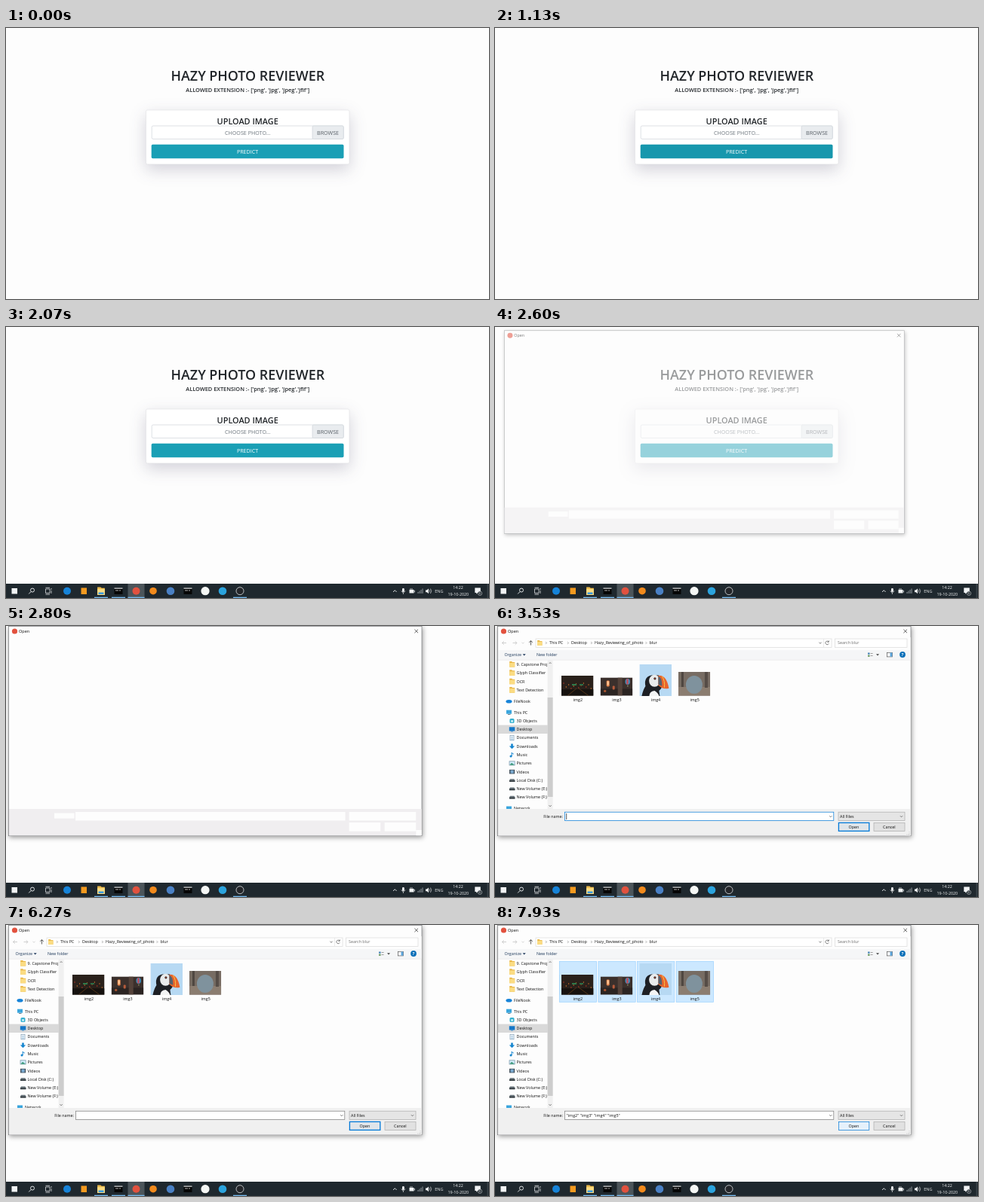
An HTML page for the animation above (8000 ms loop, 640 by 360 pixels).

```html
<!DOCTYPE html>
<html lang="en">
<head>
<meta charset="utf-8">
<title>Photo upload</title>
<style>
  html, body { margin: 0; width: 100%; height: 100%; overflow: hidden; background: #fdfdfd; }
  #stage { display: block; width: 100vw; height: 100vh; }
  text { font-family: "Open Sans", "Noto Sans", sans-serif; white-space: pre; }
  .card { filter: drop-shadow(0 7px 10.5px rgba(40, 35, 75, .2)); }
  .win { filter: drop-shadow(1px 2px 3px rgba(0, 0, 0, .4)); }
</style>
</head>
<body>
<svg id="stage" viewBox="0 0 640 360" xmlns="http://www.w3.org/2000/svg"></svg>
<script>
const LOOP = 8000;
const FPS = 15;
const UI = 5.4;

// Markup helpers
const rect = (x, y, w, h, fill, more = '') =>
  `<rect x="${x}" y="${y}" width="${w}" height="${h}" fill="${fill}" ${more}/>`;
const dot = (x, y, r, fill, more = '') =>
  `<circle cx="${x}" cy="${y}" r="${r}" fill="${fill}" ${more}/>`;
const oval = (x, y, rx, ry, fill, more = '') =>
  `<ellipse cx="${x}" cy="${y}" rx="${rx}" ry="${ry}" fill="${fill}" ${more}/>`;
const shape = (d, fill) => `<path d="${d}" fill="${fill}"/>`;
const line = (d, stroke, w = .7) =>
  `<path d="${d}" fill="none" stroke="${stroke}" stroke-width="${w}"/>`;
const text = (x, y, str, size = UI, fill = '#111', more = '') =>
  `<text x="${x}" y="${y}" font-size="${size}" fill="${fill}" ${more}>${str}</text>`;
const mid = (x, y, str, size, fill, weight = 400) =>
  text(x, y, str, size, fill, `text-anchor="middle" font-weight="${weight}"`);
const group = (id, body, more = '') => `<g id="${id}" ${more}>${body}</g>`;
const box = (x, y, w, h, fill, stroke, more = '') =>
  rect(x, y, w, h, fill, `stroke="${stroke}" stroke-width=".7" ${more}`);
const crop = (x, y, w, h, body) =>
  `<svg x="${x}" y="${y}" width="${w}" height="${h}" viewBox="${x} ${y} ${w} ${h}">${body}</svg>`;
const caretDown = (x, y, color = '#444') => line(`M${x - 1.6} ${y - .8}l1.6 1.6 1.6-1.6`, color);
const folder = (x, y, s = 1) =>
  `<g transform="translate(${x} ${y}) scale(${s})">` +
  shape('M-3.5-3.8h3l1 1h3v6.6h-7z', '#e9b84b') + rect(-3.5, -1.8, 7, 5.6, '#fbdc83') + '</g>';

function page() {
  return mid(320.4, 69.7, 'HAZY PHOTO REVIEWER', 17.9, '#212529', 600) +
    mid(320.2, 84.8, "ALLOWED EXTENSION :- ['png', 'jpg', 'jpeg','jfif']", 7.4, '#212529', 600) +
    box(185.5, 109, 269.5, 72, '#fff', '#e3e3e6', 'rx="2" class="card"') +
    box(193.2, 130, 254, 17.5, '#fff', '#ced4da', 'rx="1.8"') +
    mid(320.2, 127.9, 'UPLOAD IMAGE', 10.9, '#212529', 600) +
    mid(320.2, 141.6, 'CHOOSE PHOTO...', 7.15, '#6c757d') +
    box(406, 130, 41.2, 17.5, '#e9ecef', '#ced4da', 'rx="1.5"') +
    mid(426.6, 141.6, 'BROWSE', 7.15, '#596067') +
    rect(192.7, 154.7, 254.8, 18.5, '#1a9fb5', 'rx="1.8" id="predict"') +
    mid(320, 166.6, 'PREDICT', 7.1, '#fff');
}

function terminal(x) {
  return rect(x - 5.5, 346.5, 11, 8.5, '#060606') + rect(x - 5.5, 346.5, 11, 1.3, '#d4d7da') +
    line(`M${x - 4} 350h4m1 0h2`, '#ddd', .8);
}

function taskbar() {
  const y = 350.7, white = '#f1f3f4';
  const running = [[117, 18], [140, 18], [161.5, 22], [301, 18]];
  return rect(0, 341, 640, 19, '#1f282e') +
    rect(161.5, 341, 22, 19, '#4c555a') +
    running.map(([x, w]) => rect(x, 358.7, w, 1.3, '#76b9ed')).join('') +
    rect(7.5, 347, 7.5, 7.5, white) +
    dot(35, 349.6, 2.5, 'none', `stroke="${white}" stroke-width=".9"`) +
    line('M33.2 351.5l-3 3', white, .9) +
    line('M52.5 348h5.5v5.5h-5.5zM60 347v2m0 1v4M52.5 346.3h5.5m-5.5 9h5.5', white) +
    dot(81, y, 5, '#1683d8') +
    rect(99.5, 346.5, 7.5, 8.5, '#f39a1f') +
    folder(126, y, 1.4) + rect(122.5, 352.5, 7, 2.5, '#3a9be0') +
    terminal(149) +
    dot(172.5, y, 5, '#e2523f') +
    dot(195, y, 4.8, '#f28a1c') +
    dot(218, y, 5.3, '#4a80c4') +
    terminal(241) +
    dot(264, y, 5.6, '#f4f6f4') +
    dot(287, y, 5.3, '#2ba3dd') +
    dot(310, y, 5, '#24262a', 'stroke="#dfe2e4" stroke-width=".8"') +
    line('M513 352l2.3-2.3 2.3 2.3', white, .9) +
    rect(525, 347, 2.8, 5, white, 'rx="1.3"') + line('M523.8 350.5q2.6 4.5 5.2 0M526.4 353v2', white) +
    rect(534.5, 349, 6, 4.5, white) + line('M536 347v2m2-2v2M541.5 350v2.5', white) +
    line('M546 354v-2m2 2v-3.5m2 3.5v-5m2 5v-6.5', '#8c9398', 1) +
    shape('M556 349.6h1.7l2.2-2v6.6l-2.2-2H556z', white) +
    line('M561 349q1.4 1.8 0 3.6m1.4-5q2.7 3.2 0 6.4', white, .6) +
    text(568.3, 352.7, 'ENG', 5.5, white) +
    mid(599, 348.2, '14:22', 5.3, white) +
    mid(599.3, 356.6, '19-10-2020', 5.3, white) +
    shape('M621.3 346.5h7.5v6.5h-4l-1.8 1.8V353h-1.7z', white) +
    dot(628, 353.8, 2.7, '#1f282e', `stroke="${white}" stroke-width=".5"`) +
    mid(628, 355.4, '6', 4.2, white) +
    line('M638.2 341v19', '#737b80', .5);
}

function tree() {
  const top = ['9. Capstone Proj', 'Glyph Classifier', 'OCR', 'Text Detection'];
  const drives = ['3D Objects', 'Desktop', 'Documents', 'Downloads', 'Music', 'Pictures',
    'Videos', 'Local Disk (C:)', 'New Volume (E:)', 'New Volume (F:)'];
  const icons = [
    y => rect(19.5, y - 3, 6, 6, '#35b0cf', 'rx="1.5"') + rect(21.3, y - 1, 2.5, 3, '#c9eff7'),
    y => rect(18.8, y - 3, 7.5, 5.2, '#1678c8') + rect(21, y + 2.3, 3, .8, '#1678c8'),
    y => box(20, y - 3, 5, 6.3, '#fff', '#7d9cb5') + line(`M21 ${y - 1}h3m-3 1.6h3m-3 1.6h3`, '#5596c8', .5),
    y => shape(`M21.2 ${y - 3.2}h2.6v3h2.4l-3.7 3.6-3.7-3.6h2.4z`, '#1686d0'),
    y => dot(21, y + 2, 1.5, '#1686d0') + line(`M22.2 ${y + 2}v-5q1 2 2.6 2`, '#1686d0', 1),
    y => box(19, y - 2.6, 7.2, 5.2, '#cfeaf8', '#7b95a6') + shape(`M19.4 ${y + 2.3}l2.6-3 4 3z`, '#3c9a7a'),
    y => rect(19, y - 2.8, 7.2, 5.6, '#46535e') + rect(20.5, y - 2, 4.2, 4, '#78a9d0')
  ];
  const disk = y => shape(`M19 ${y}l1-1.6h5.4l1 1.6v2H19z`, '#69747b') + rect(19, y + .4, 7.4, 1.6, '#31383c');
  return rect(4, 131.6, 66, 11.4, '#d9d9d9') +
    top.map((s, i) => folder(22.7, 50.8 + i * 11.35) + text(28.5, 52.8 + i * 11.35, s)).join('') +
    oval(18.5, 100.3, 4, 2.3, '#1683d8') + text(25, 101.8, 'FileNook') +
    rect(15, 111.7, 7, 5, '#3aa5dd') + rect(17, 117.2, 3.5, .8, '#4f6470') + text(25, 116.8, 'This PC') +
    drives.map((s, i) => {
      const y = 126 + i * 11.27;
      return (icons[i] || disk)(y) + text(28.5, y + 1.9, s);
    }).join('') +
    rect(15, 239.5, 7, 4, '#3aa5dd') + text(25, 244, 'Network');
}

function nightRoad(x, y, w, h) {
  let lights = '';
  for (let i = 0; i < 12; i++) {
    lights += dot(x + 3 + i * 3.3, y + 10 + (i * 5) % 8, .7, i % 3 ? '#d9782e' : '#c93426');
  }
  return rect(x, y, w, h, '#2a211b') + rect(x, y + h * .68, w, h * .32, '#16120f') + lights +
    rect(x + 14, y + 11, 6, 2, '#2f7a4b') + rect(x + 24, y + 11, 5, 2, '#2c6d46') +
    line(`M${x + 20} ${y + 17}L${x + 8} ${y + h}M${x + 23} ${y + 17}L${x + 36} ${y + h}`, '#7a4a20', .6);
}

function lanterns(x, y, w, h) {
  return rect(x, y, w, h, '#3b302c') + rect(x, y + 15, w, h - 15, '#2b2422') +
    rect(x + 23, y, 6, h, '#54423a') +
    rect(x + 8, y + 4, 4, 8, '#e8864e', 'rx="1.3"') + rect(x + 9, y + 5, 2, 5, '#ffd0a0') +
    rect(x + 16, y + 11, 3, 5, '#b65b3b', 'rx="1"') + dot(x + 6, y + 18, 1.7, '#a5532f') +
    oval(x + 36, y + 5.5, 3.2, 4, '#3f8fc0') + rect(x + 34.5, y + 2, 2.5, 7, '#c34a56') +
    rect(x + 35.3, y + 10.5, 1.6, 1.5, '#886');
}

function seabird(x, y, w, h) {
  return rect(x, y, w, h, '#b7d9f3') +
    shape(`M${x + 3} ${y + h}q2-9 5-13q-3-14 11-15q11-1 13 9q-2 9-6 12l1 7z`, '#1d1f24') +
    oval(x + 20, y + 22, 7.3, 8, '#e9ebec') +
    shape(`M${x + 13} ${y + h}q0-6 7-7q5 3 6 7z`, '#f4f5f5') +
    shape(`M${x + 25} ${y + 15}q11-1 14 17q-8 2-14-4z`, '#e8642c') +
    shape(`M${x + 25} ${y + 16}q5 1 5 13l-5-2z`, '#56626f') +
    line(`M${x + 30} ${y + 16}q4 6 3 15`, '#f6c64a', 1) +
    dot(x + 20.5, y + 19, 1.6, '#26201f') + dot(x + 20.5, y + 19, .7, '#cf4d32');
}

function forestToy(x, y, w, h) {
  return rect(x, y, w, h, '#776c63') + rect(x, y + 20, w, h - 20, '#8b7d70') +
    rect(x + 4, y, 3, 20, '#4e4640') + rect(x + 35, y, 4, 21, '#554c46') +
    oval(x + 21, y + 17, 11, 12, '#7f929d');
}

function files() {
  const thumbs = [
    [nightRoad, 88, 66, 42.5, 26.7], [lanterns, 139.7, 68.4, 42.6, 24.2],
    [seabird, 191.4, 50.8, 42.6, 42.2], [forestToy, 242.9, 61, 42.3, 31.7]
  ];
  const marks = thumbs.map((_, i) => box(85.3 + i * 51.6, 48.3, 49.3, 54, '#cce8ff', '#99d1ff')).join('');
  return group('marks', marks) + thumbs.map(([draw, x, y, w, h], i) =>
    crop(x, y, w, h, draw(x, y, w, h)) + mid(109.8 + i * 51.6, 99.7, `img${i + 2}`, UI, '#111')).join('');
}

function navBar() {
  const crumbs = [[72, 'This PC'], [101, 'Desktop'], [132, 'Hazy_Reviewing_of_photo'], [204.5, 'blur']];
  const gray = '#777', pale = '#c4c4c4';
  return line('M15 22.5h-5.5m2.3-2.3l-2.3 2.3 2.3 2.3M23.5 22.5h5.5m-2.3-2.3l2.3 2.3-2.3 2.3', pale, .8) +
    caretDown(37, 22.5, pale) +
    line('M47.5 25.5v-6m-2.4 2.4l2.4-2.4 2.4 2.4', '#555', .9) +
    box(54, 17, 392, 11.3, '#fff', '#d9d9d9') + folder(59.3, 22.5, .9) +
    crumbs.map(([x, s]) => line(`M${x - 5} 21l1.5 1.5-1.5 1.5`, gray, .6) + text(x, 24.4, s)).join('') +
    caretDown(431, 22.5) + line('M435.5 17v11', '#dedede', .6) +
    line('M442 21a2.3 2.3 0 1 0 .3 2.3M442.3 19.3v2h-2', '#555', .7) +
    box(450.5, 17, 95.5, 11.3, '#fff', '#d9d9d9') + text(454, 24.4, 'Search blur', UI, '#6d6d6d') +
    rect(4, 32, 546.6, 13, '#f5f6f7') + line('M4 45.2h546.6', '#e2e3e5', .6) +
    text(12.5, 40, 'Organize', UI, '#1e395b') + shape('M36.7 37.2h4l-2 2.2z', '#1e395b') +
    text(55, 40, 'New folder', UI, '#1e395b') +
    rect(494, 35.5, 2.6, 2.2, '#4a86b8') + rect(494, 38.6, 2.6, 2.2, '#6b9a62') +
    line('M497.6 36.5h3m-3 3h3', '#777') + shape('M505 37.2h4l-2 2.2z', '#444') +
    box(519.5, 35.3, 7, 5.6, '#fff', '#555') + rect(523.5, 35.5, 2.8, 5.2, '#5ba6dd') +
    dot(540, 38, 3.9, '#0a6fb8') + mid(540, 40.2, '?', 6, '#fff', 700);
}

function content() {
  return rect(4, 15, 546.6, 228, '#fdfdfd') + navBar() +
    crop(4, 45.5, 66, 197.5, tree()) +
    rect(69.6, 45.5, 7, 197.5, '#f0f0f0') + rect(69.6, 95, 7, 132, '#cdcdcd') +
    line('M71.6 50l1.5-1.5 1.5 1.5', '#555') + caretDown(73.1, 239) +
    files() +
    rect(4, 243, 546.6, 35.3, '#f0f0f0') +
    text(90, 254.5, 'File name:', UI, '#111', 'text-anchor="end"') +
    box(92.4, 247.2, 356.4, 11.2, '#fff', '#0078d7', 'id="field"') +
    caretDown(444.8, 253) +
    group('caret', line('M94.7 249v8', '#111', .7)) +
    group('names', text(94.6, 254.6, '"img2" "img3" "img4" "img5"')) +
    box(455, 247.2, 88, 11.2, '#e5e5e5', '#adadad') + text(457, 254.6, 'All Files') + caretDown(538.5, 253) +
    box(455.4, 261.4, 40.4, 11, '#dfe5ea', '#0078d7', 'id="open"') + mid(475.4, 268.7, 'Open', UI, '#111') +
    box(502, 261.4, 41, 11, '#e1e1e1', '#adadad') + mid(522.4, 268.7, 'Cancel', UI, '#111') +
    [0, 1, 2].map(i => dot(549 - i * 1.6, 277, .45, '#aaa') + dot(549, 277 - i * 1.6, .45, '#aaa')).join('');
}

function dialog() {
  const blanks = [[64, 248.5, 26.5, 7.2], [92, 247, 357.5, 11.5], [454.7, 247, 88.5, 11.5],
    [454.7, 261, 41.5, 11.7], [501.7, 261, 41.5, 11.7], [543.3, 271, 7.2, 7.2]];
  return rect(3.6, .3, 547.4, 278.4, '#fdfdfd', 'class="win" stroke="#77797c" stroke-width=".7"') +
    dot(11.5, 7, 3.6, '#e2523f') + text(17, 9.2, 'Open', 5.5) +
    line('M541.4 4.6l4.6 4.6m0-4.6l-4.6 4.6', '#222', .7) +
    rect(4, 243, 546.6, 35.3, '#f0eef0') +
    blanks.map(b => rect(...b, '#fdfdfd')).join('') +
    group('content', content());
}

const stage = document.getElementById('stage');
stage.innerHTML = rect(0, 0, 640, 360, '#fdfdfd') + page() +
  group('taskbar', taskbar()) + group('dialog', dialog());

const parts = {};
stage.querySelectorAll('[id]').forEach(el => parts[el.id] = el);

const ramp = (t, a, b) => Math.min(1, Math.max(0, (t - a) / (b - a)));
const easeOut = k => 1 - (1 - k) ** 3;
const show = (el, on) => el.setAttribute('visibility', on ? 'inherit' : 'hidden');
const hex = c => [1, 3, 5].map(i => parseInt(c.slice(i, i + 2), 16));
function blend(a, b, k) {
  const to = hex(b);
  return `rgb(${hex(a).map((v, i) => Math.round(v + (to[i] - v) * k))})`;
}

function pose(t) {
  const hover = ramp(t, 0, 130) - ramp(t, 1930, 2070);
  parts.predict.setAttribute('fill', blend('#1a9fb5', '#1797ad', hover));

  const rise = easeOut(ramp(t, 1470, 1930));
  show(parts.taskbar, rise > 0);
  parts.taskbar.setAttribute('transform', `translate(0 ${19 * (1 - rise)})`);

  const grow = easeOut(ramp(t, 2540, 2800));
  const scale = .93 + .07 * grow;
  show(parts.dialog, t >= 2600);
  parts.dialog.setAttribute('opacity', grow);
  parts.dialog.setAttribute('transform', `translate(277 140) scale(${scale}) translate(-277 -140)`);
  show(parts.content, t >= 3530);

  const blinkOn = Math.floor((t - 3335) / 533.3) % 2 === 0;
  show(parts.caret, t >= 3530 && t < 6000 && blinkOn);
  parts.field.setAttribute('stroke', blend('#0078d7', '#7a7a7a', ramp(t, 5930, 6270)));

  show(parts.marks, t >= 6600);
  show(parts.names, t >= 6600);

  const over = ramp(t, 7600, 7930);
  parts.open.setAttribute('fill', blend('#dfe5ea', '#e5f1fb', over));
  parts.open.setAttribute('stroke-width', 1.3 - .6 * over);
}

function tick() {
  const t = performance.now() % LOOP;
  const step = Math.floor((t + 5) * FPS / 1000);
  pose(Math.round(step * 100 / FPS) * 10 % LOOP);
  requestAnimationFrame(tick);
}
pose(0);
tick();
</script>
</body>
</html>
```
